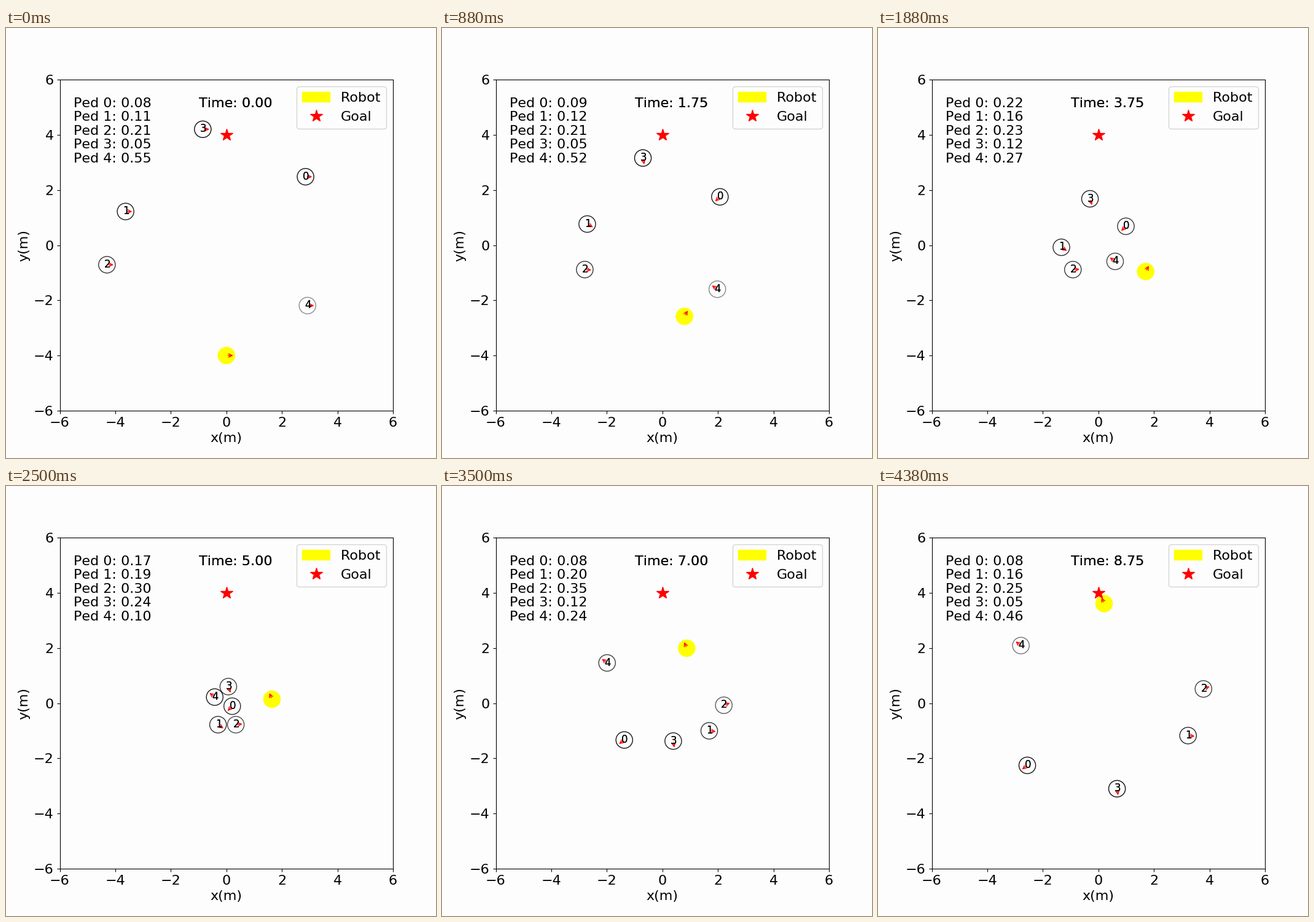
A matplotlib script that plays this animation: 700x700 px, repeating every 4.51 s.

```python
import math

import matplotlib.pyplot as plt
import numpy as np
from matplotlib.animation import FuncAnimation
from matplotlib.lines import Line2D
from matplotlib.patches import ArrowStyle, Circle, FancyArrowPatch

LOOP_MS = 4510
TICKS = 205          # drawn frames per loop, finer than the simulation steps
STEPS = 36
MEET = 20            # step at which the crowd is densest
DT = 0.25
RADIUS = 0.3
PAPER = "#fdfdfd"

# Each pedestrian: start, halfway point, position in the crowd (metres)
PEDS = np.array([
    [(2.85, 2.48), (1.69, 1.38), (0.21, -0.11)],
    [(-3.63, 1.22), (-2.23, 0.49), (-0.30, -0.78)],
    [(-4.30, -0.71), (-2.11, -0.91), (0.34, -0.78)],
    [(-0.85, 4.20), (-0.58, 2.64), (0.07, 0.60)],
    [(2.92, -2.19), (1.50, -1.26), (-0.42, 0.22)],
])

# Attention bumps: base, height, centre step, width
BUMPS = [(0.08, 0.14, 16, 6), (0.11, 0.10, 25, 12),
         (0.21, 0.15, 26, 8), (0.05, 0.20, 21.5, 6.5)]

# Robot legs: heading in degrees, speed in m/s, number of steps
LEGS = [(60.8, 0.93, 17), (112.5, 1, 18)]


def walk(start, half, crowd):
    """Curve into the crowd, then head for the point opposite the start."""
    track = []
    for u in np.linspace(0, 1, MEET + 1):
        track.append(start * (1 - u) * (1 - 2 * u) + half * 4 * u * (1 - u)
                     + crowd * u * (2 * u - 1))
    while len(track) < STEPS:
        gap = -start - track[-1]
        track.append(track[-1] + DT * gap / max(1, np.hypot(*gap)))
    return np.array(track)


def drive():
    track = [np.array([0.0, -4.0])]
    for heading, speed, count in LEGS:
        a = math.radians(heading)
        for _ in range(count):
            track.append(track[-1] + DT * speed * np.array([math.cos(a), math.sin(a)]))
    return np.array(track)


def headings(track):
    d = np.diff(track, axis=0)
    return np.concatenate([[0], np.arctan2(d[:, 1], d[:, 0])])


def attention():
    """Scores add up to one; the last pedestrian takes the remainder."""
    s = np.arange(STEPS)
    rows = [base + h * np.exp(-((s - c) / w) ** 2) for base, h, c, w in BUMPS]
    return rows + [1 - sum(rows)]


tracks = [drive()] + [walk(*p) for p in PEDS]
angles = [headings(t) for t in tracks]
scores = attention()

plt.rcParams["font.family"] = "DejaVu Sans"
plt.rcParams["text.kerning_factor"] = 6
fig, ax = plt.subplots(figsize=(7, 7), dpi=100, facecolor=PAPER)
ax.set_facecolor(PAPER)
ax.tick_params(labelsize=16)
ax.set_xlim(-6, 6)
ax.set_ylim(-6, 6)
ax.set_xlabel("x(m)", fontsize=16)
ax.set_ylabel("y(m)", fontsize=16)

robot = Circle((0, -4), RADIUS, color="yellow")
goal = Line2D([0], [4], color="red", marker="*", linestyle="None", markersize=15)
ax.add_artist(robot)
ax.add_artist(goal)
ax.legend([robot, goal], ["Robot", "Goal"], fontsize=16, loc="upper right",
          facecolor=PAPER, edgecolor="0.8")

discs = [robot]
digits, notes = [], []
for i in range(len(PEDS)):
    discs.append(ax.add_artist(Circle((0, 0), RADIUS, fill=False)))
    digits.append(ax.text(0, 0, str(i), fontsize=12))
    notes.append(ax.text(-5.5, 5 - 0.5 * i, "", fontsize=16))
clock = ax.text(-1, 5, "", fontsize=16)

# Drawn a second time for heavier glyph edges
for label in digits + [clock]:
    ax.add_artist(label)

arrows = []
for _ in discs:
    arrow = FancyArrowPatch((0, 0), (1, 0), color="red",
                            arrowstyle=ArrowStyle("->", head_length=4, head_width=2))
    arrows.append(ax.add_artist(arrow))


def draw(tick):
    n = min((tick + 1) * STEPS // TICKS, STEPS - 1)
    for disc, arrow, track, angle in zip(discs, arrows, tracks, angles):
        x, y = track[n]
        a = angle[n]
        disc.center = x, y
        arrow.set_positions((x, y), (x + RADIUS * math.cos(a), y + RADIUS * math.sin(a)))
    for i, score in enumerate(scores):
        x, y = tracks[i + 1][n]
        digits[i].set_position((x - 0.1, y - 0.1))
        discs[i + 1].set_edgecolor(str(score[n]))
        notes[i].set_text(f"Ped {i}: {score[n]:.2f}")
    clock.set_text(f"Time: {n * DT:.2f}")
    return discs + arrows + digits + notes + [clock]


anim = FuncAnimation(fig, draw, frames=TICKS, interval=LOOP_MS / TICKS, repeat=True)
plt.show()
```
